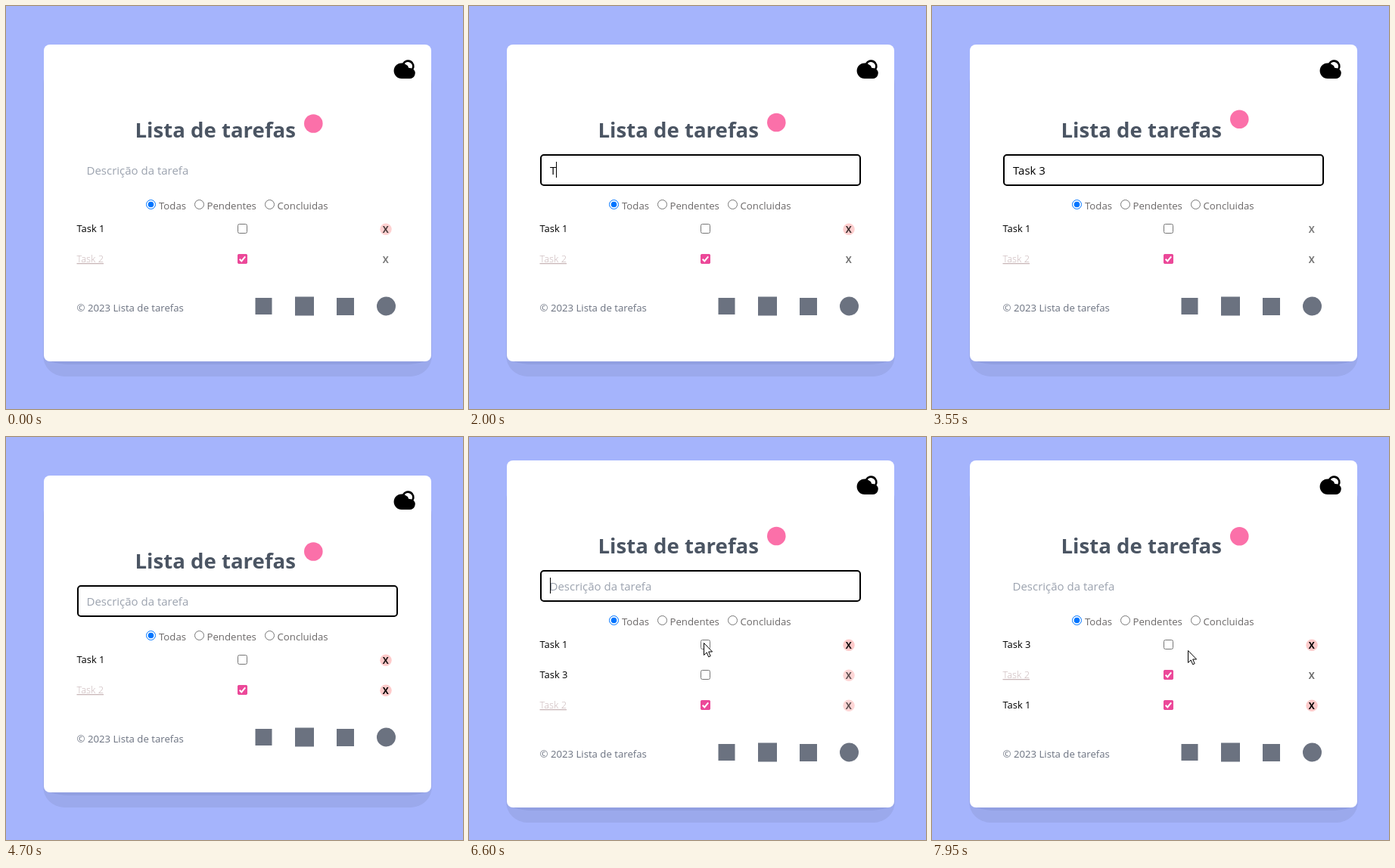
Write an HTML page that moves like this. It is 604x533 px and loops after 8000 ms.

```html
<!DOCTYPE html>
<html lang="pt">
<head>
<meta charset="utf-8">
<style>
  html, body { margin: 0; width: 100%; height: 100%; overflow: hidden; background: #a5b4fc; }
  svg { display: block; font: 13.2px "Open Sans", sans-serif; }
  text { white-space: pre; }
  .title { font-size: 27.6px; font-weight: 700; fill: #4b5563; }
  .field { font-size: 15px; }
  .label { fill: #6b6868; }
  .grey { fill: #6b7280; }
  .task { font-size: 12.9px; }
  .done { fill: #c9b6b8; font-weight: 300; text-decoration: underline; text-decoration-color: #d8a9ae; }
  .remove { font-size: 12px; font-weight: 700; text-anchor: middle; }
  .outline { fill: #fff; stroke: #767676; }
</style>
</head>
<body>
<svg id="stage" width="604" height="533" viewBox="0 0 604 533">
  <g id="page">
    <rect id="shadow" x="49" y="76" width="514" rx="28" fill="#9ba9ec"/>
    <rect id="shadowCore" x="51" y="90" width="510" rx="32" ry="12" fill="#919fe1"/>
    <rect id="card" x="50" y="51" width="512" rx="8" fill="#fff"/>
    <path transform="translate(511.3 69.1) scale(1.28)" d="M9.98 5.06a6.5 6.5 0 1 1 11.29 6.44A5.5 5.5 0 0 1 17.5 21H9a8 8 0 1 1 .98-15.94zm2.07.54a8 8 0 0 1 4.41 4.5 5.5 5.5 0 0 1 3.12.3 4.5 4.5 0 0 0-7.53-4.8z"/>
    <text class="title" x="170.5" y="174">Lista de tarefas</text>
    <circle id="ball" cx="406.3" r="12.3" fill="#fb70a9"/>

    <rect id="ring" x="95" y="197" width="422" height="40" rx="4" fill="none" stroke="#000" stroke-width="2"/>
    <text id="hint" class="field" x="106.5" y="223" fill="#9ca3af">Descrição da tarefa</text>
    <text id="typed" class="field" x="107" y="223"></text>
    <rect id="caret" y="206" width="1" height="21"/>

    <circle cx="191.5" cy="262.5" r="6" fill="#fff" stroke="#0075ff"/>
    <circle cx="191.5" cy="262.5" r="3.8" fill="#0075ff"/>
    <circle class="outline" cx="255.5" cy="262.5" r="6"/>
    <circle class="outline" cx="348.5" cy="262.5" r="6"/>
    <g class="label">
      <text x="202" y="269">Todas</text>
      <text x="265.5" y="269">Pendentes</text>
      <text x="358.5" y="269">Concluidas</text>
    </g>
    <g id="rows"></g>

    <g id="footer" class="grey">
      <text x="93.5" y="404">© 2023 Lista de tarefas</text>
      <rect x="329.5" y="386" width="22" height="22"/>
      <rect x="382" y="384.5" width="25" height="25"/>
      <rect x="437" y="386" width="23" height="23"/>
      <circle cx="502.5" cy="397" r="12.5"/>
    </g>
  </g>
  <path id="arrow" d="M.5 .5V16.5L4.2 13L6.7 18.8L9.2 17.7L6.7 12H11.6Z" fill="#fff" stroke="#000"/>
  <path id="beam" d="M-3 -8.5H3M0 -8.5V8.5M-3 8.5H3" fill="none" stroke="#000"/>
</svg>
<script>
const LOOP = 8000, BOUNCE = 970, PULSE = 1940;
const FOCUS = 1100, SUBMIT = 4150, ADDED = 5300, CHECKED = 6700, SORTED = 7850;
const KEYS = [1900, 2100, 2250, 2450, 2750, 3000];
const PATH = [[100, 72, -20], [850, 160, 216], [5600, 160, 216], [5750, 183, 226],
              [6550, 310, 272], [6800, 310, 272], [7100, 338, 282], [LOOP, 338, 282]];

const el = id => document.getElementById(id);
const show = (node, on) => node.setAttribute('visibility', on ? 'visible' : 'hidden');
const move = (node, x, y) => node.setAttribute('transform', `translate(${x} ${y})`);
const fract = x => x - Math.floor(x);

function bezier(x1, y1, x2, y2) {
  const at = (a, b, s) => 3 * (1 - s) ** 2 * s * a + 3 * (1 - s) * s * s * b + s ** 3;
  return x => {
    let low = 0, high = 1;
    for (let i = 0; i < 20; i++) {
      const mid = (low + high) / 2;
      if (at(x1, x2, mid) < x) low = mid; else high = mid;
    }
    return at(y1, y2, low);
  };
}
const fall = bezier(.8, 0, 1, 1), rise = bezier(0, 0, .2, 1), smooth = bezier(.4, 0, .6, 1);

const rows = [1, 2, 3].map(n => {
  const g = document.createElementNS('http://www.w3.org/2000/svg', 'g');
  g.innerHTML = `
    <text class="task ${n === 2 ? 'done' : ''}" x="93.5" y="299">Task ${n}</text>
    <rect class="outline" x="306.5" y="288.5" width="12" height="12" rx="2"/>
    <g class="check"><rect x="306" y="288" width="13" height="13" rx="2" fill="#ec4899"/>
      <path d="M308.7 294.8L311.3 297.4L316.2 291.4" fill="none" stroke="#fff" stroke-width="2"/></g>
    <circle cx="502" cy="295.3" r="7.7" fill="#fecaca"/>
    <text class="remove" x="501.7" y="299.7">X</text>`;
  el('rows').append(g);
  return { g, check: g.querySelector('.check'), disc: g.querySelector('circle'), cross: g.querySelector('.remove') };
});

function drawRow(row, slot, checked, brightAt, t) {
  show(row.g, slot >= 0);
  move(row.g, 0, slot * 40);
  row.check.style.display = checked ? '' : 'none';
  const p = fract((t - brightAt) / PULSE) * 2;
  const opacity = p < 1 ? 1 - smooth(p) / 2 : .5 + smooth(p - 1) / 2;
  row.cross.setAttribute('opacity', opacity);
  // The disc drops out entirely at the pale end of the pulse.
  row.disc.setAttribute('opacity', opacity > .6 ? Math.min(1, opacity + .15) : 0);
}

function drawPointer(t) {
  const i = Math.max(1, PATH.findIndex(p => p[0] > t));
  const [t0, x0, y0] = PATH[i - 1], [t1, x1, y1] = PATH[i];
  const k = smooth(Math.min(1, Math.max(0, (t - t0) / (t1 - t0))));
  const x = x0 + (x1 - x0) * k, y = y0 + (y1 - y0) * k;
  const visible = t > 100 && (t < KEYS[0] || t > 5600);
  const top = t < ADDED ? 196 : 176;
  const overField = x > 94 && y > top && y < top + 42;
  show(el('arrow'), visible && !overField);
  show(el('beam'), visible && overField);
  move(el('arrow'), x, y);
  move(el('beam'), x, y);
}

function draw(t) {
  const grown = t >= ADDED, sorted = t >= SORTED, extra = grown ? 40 : 0;
  move(el('page'), 0, -extra / 2);
  move(el('footer'), 0, extra);
  el('card').setAttribute('height', 419 + extra);
  el('shadow').setAttribute('height', 414 + extra);
  el('shadowCore').setAttribute('height', 384 + extra);

  const p = fract(t / BOUNCE + .488);
  const lift = p < .5 ? 1 - fall(p * 2) : rise(p * 2 - 1);
  el('ball').setAttribute('cy', 156 - 6.6 * lift);

  const focused = t >= FOCUS && t < CHECKED;
  const text = t < SUBMIT ? 'Task 3'.slice(0, KEYS.filter(k => k <= t).length) : '';
  el('typed').textContent = text;
  show(el('ring'), focused);
  show(el('hint'), !text);
  const lastEdit = Math.max(...[FOCUS, ...KEYS, SUBMIT].filter(k => k <= t));
  show(el('caret'), focused && (t - lastEdit) % 1030 < 515);
  el('caret').setAttribute('x', Math.round(107 + (text ? el('typed').getComputedTextLength() : 0)));

  drawRow(rows[0], sorted ? 2 : 0, t >= CHECKED, sorted ? SORTED : 530, t);
  drawRow(rows[1], grown && !sorted ? 2 : 1, true, grown ? ADDED : 830, t);
  drawRow(rows[2], !grown ? -1 : sorted ? 0 : 1, false, sorted ? SORTED : ADDED, t);
  drawPointer(t);
}

function tick() {
  draw(performance.now() % LOOP);
  requestAnimationFrame(tick);
}
tick();
</script>
</body>
</html>
```
